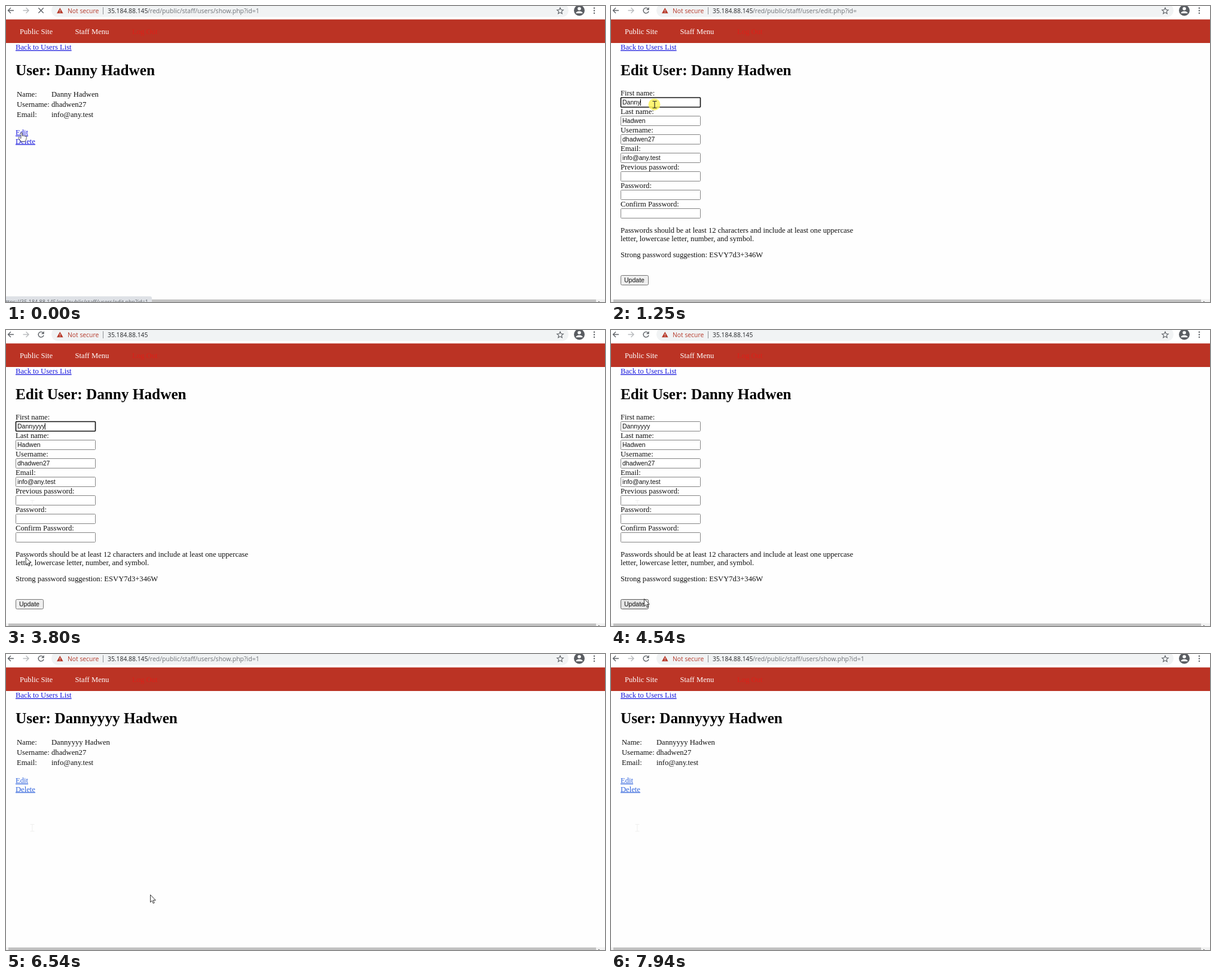
These frames come from a looping animation (1002x496 px, 8 s). An HTML page:

```html
<!DOCTYPE html>
<html lang="en">
<head>
<meta charset="utf-8">
<title>Edit user</title>
<style>
html, body { margin: 0; width: 100%; height: 100%; overflow: hidden; background: #fefefe; }
svg { display: block; width: 1002px; height: 496px; }
text { white-space: pre; }
.page { font: 12.63px "Liberation Serif", "Times New Roman", serif; fill: #111; }
.h1 { font-size: 25.27px; font-weight: bold; fill: #000; }
.link { fill: #1a1add; text-decoration: underline; }
.fresh .act { fill: #2f62dc; }
.ctl { font: 10.53px "Liberation Sans", Arial, sans-serif; fill: #111; }
.ui { font: 10.35px "Open Sans", "Noto Sans", sans-serif; }
.status { font-size: 9px; fill: #5f6368; }
.box { fill: #fff; stroke: #858585; }
.icon { fill: none; stroke: #5f6368; stroke-width: 1.4; }
</style>
</head>
<body>
<svg id="stage" viewBox="0 0 1002 496" xmlns="http://www.w3.org/2000/svg">
  <rect width="1002" height="496" fill="#fefefe"/>

  <g id="toolbar">
    <rect width="1002" height="23" fill="#fff"/>
    <rect x="76" y="-4" width="865" height="22.5" rx="11.2" fill="#f1f3f4"/>
    <path class="icon" d="M13 7.5H3.5M8 3 3.5 7.5 8 12"/>
    <path class="icon" style="stroke:#b9bbbe" d="M28.500 7.500H38M33.500 3 38 7.500 33.500 12"/>
    <path id="stop" class="icon" d="M54.300 3.300 62.700 11.700M62.700 3.300 54.300 11.700"/>
    <g id="reload">
      <path class="icon" d="M62 4.600A4.500 4.500 0 1 0 63 8.800"/>
      <path fill="#5f6368" d="M63.700 2V6.800H58.900Z"/>
    </g>
    <path fill="#b83a2a" d="M90.300 3 95.600 12.300H85Z"/>
    <path stroke="#f1f3f4" d="M90.300 6.300V9.200M90.300 10.100V11.200"/>
    <text class="ui" x="103" y="12" fill="#b53a2b">Not secure</text>
    <path stroke="#8d9094" d="M162.500 2V14"/>
    <text class="ui" x="170" y="12" fill="#26282b">35.184.88.145</text>
    <text class="ui" id="path" x="237" y="12" fill="#6d7176" style="font-size:10.5px"></text>
    <path class="icon" style="stroke-width:1.100" d="M927 2.800 928.500 6.300 932.300 6.600 929.400 9.100 930.300 12.800 927 10.800 923.700 12.800 924.600 9.100 921.700 6.600 925.500 6.300Z"/>
    <circle cx="959" cy="7.500" r="9" fill="#5a5d62"/>
    <circle cx="959" cy="4.500" r="2.800" fill="#fff"/>
    <path fill="#fff" d="M953.300 12.200C953.300 7.500 964.700 7.500 964.700 12.200Z"/>
    <g fill="#5f6368">
      <circle cx="984" cy="3.500" r="1.200"/><circle cx="984" cy="7.700" r="1.200"/><circle cx="984" cy="11.900" r="1.200"/>
    </g>
  </g>

  <g class="page">
    <rect y="22.500" width="1002" height="39.500" fill="#bb3324"/>
    <text x="23" y="47" fill="#fff">Public Site</text>
    <text x="115.500" y="47" fill="#fff">Staff Menu</text>
    <text x="211" y="47" fill="#dc2019">Log Out</text>
    <text class="link" x="16" y="73">Back to Users List</text>
    <text class="h1" id="title" x="16" y="116"></text>
    <g id="show"></g>
    <g id="edit"></g>
  </g>

  <path id="ghost" fill="none" stroke="#efefee" d="M40.500 285.500H47.500M44 285.500V297M40.500 297H47.500"/>

  <rect y="491.500" width="1002" height="5" fill="#f1f1f1"/>
  <rect id="thumb" x="4" y="491.800" width="983" height="5"/>
  <path fill="#505050" d="M991 494.500 993.500 496H991Z"/>
  <g id="bubble">
    <path id="bubbleBox" fill="#dee1e6"/>
    <text class="ui status" id="status" y="498.500"></text>
  </g>

  <circle id="halo" r="10" fill="#fbf25c" opacity=".85"/>
  <g id="cursor">
    <path id="hand" fill="#fff" stroke="#333" stroke-width=".8" d="M-2 -6V3L-4.500 1C-6 0-7 1.500-6 2.500L-2 8H5C7 5 7.500 2 7 -.500 6.500 -1.500 5 -1.500 5 -.500 4.500 -2 3 -2 2.700 -1 2 -2.200 .5 -2 .3 -1V-6C.3 -7.500-2 -7.500-2 -6Z"/>
    <path id="beam" fill="none" stroke="#222" stroke-width="1.100" d="M-3.500 -5.500H-1L0 -5 1 -5.500H3.500M0 -5V5.500M-3.500 6H-1L0 5.500 1 6H3.500"/>
    <path id="arrow" fill="#fff" stroke="#222" stroke-width=".9" d="M.5 .5V13L3.300 10.300 5.200 14.800 7.200 14 5.300 9.600H9.300Z"/>
  </g>
</svg>
<script>
const LOOP = 8000;
const FIRST = "Danny", LAST = "Hadwen", LOGIN = "dhadwen27", MAIL = "info@any.test";
const HOST = "35.184.88.145", DIR = "/red/public/staff/users/";
const $ = id => document.getElementById(id);

function add(parent, tag, attrs, label) {
  const el = document.createElementNS("http://www.w3.org/2000/svg", tag);
  for (const key in attrs) el.setAttribute(key, attrs[key]);
  if (label) el.textContent = label;
  return parent.appendChild(el);
}
const text = (parent, x, y, label, cls = "") => add(parent, "text", { x, y, class: cls }, label);
const show = (id, on) => $(id).setAttribute("visibility", on ? "visible" : "hidden");
const within = (t, a, b) => t >= a && t < b;
function set(el, attrs) {
  for (const key in attrs) el.setAttribute(key, attrs[key]);
}

// user details page
const details = $("show");
["Name:", "Username:", "Email:"].forEach((s, i) => text(details, 18, 152 + 17 * i, s));
const fullName = text(details, 76, 152, " ");
text(details, 76, 169, LOGIN);
text(details, 76, 186, MAIL);
text(details, 16, 216, "Edit", "link act");
text(details, 16, 230.5, "Delete", "link act");

// edit form
const form = $("edit");
const fields = [["First name:", FIRST], ["Last name:", LAST], ["Username:", LOGIN], ["Email:", MAIL],
  ["Previous password:"], ["Password:"], ["Confirm Password:"]].map(([label, value], i) => {
  const y = 31 * i;
  text(form, 16, 150 + y, label);
  const box = add(form, "rect", { class: "box", x: 16.5, y: 153.5 + y, width: 133, height: 16, rx: 1 });
  return { box, value: text(form, 19, 165 + y, value || "", "ctl") };
});
text(form, 16, 380, "Passwords should be at least 12 characters and include at least one uppercase");
text(form, 16, 394, "letter, lowercase letter, number, and symbol.");
text(form, 16, 421, "Strong password suggestion: ESVY7d3+346W");
const button = add(form, "rect", { x: 16.5, y: 451.5, width: 46, height: 16, rx: 2 });
text(form, 22, 463, "Update", "ctl");
const caret = add(form, "rect", { y: 156, width: 1, height: 11, fill: "#111" });

// pointer moves: start, end, steps, control point, end point
const START = [27, 219];
const MOVES = [
  [460, 1050, 9, [65, 235], [73, 165]],
  [3340, 3530, 3, [44, 230], [44, 362]],
  [3730, 4140, 6, [2, 420], [55, 450]],
  [5950, 6010, 2, [140, 412], [215, 404]],
  [6140, 6210, 2, [230, 403], [241, 403]],
  [6680, 7150, 7, [420, 340], [561, 471]],
  [7480, 7800, 6, [568, 485], [575, 500]]
];
function pointer(t) {
  let from = START;
  for (const [a, b, n, mid, to] of MOVES) {
    if (t < a) break;
    const p = Math.min(1, (Math.floor((t - a) / (b - a) * (n - 1)) + 1) / n), q = 1 - p;
    from = [0, 1].map(i => q * q * from[i] + 2 * p * q * mid[i] + p * p * to[i]);
    if (p < 1) break;
  }
  return from;
}

function address(t) {
  if (t < 130) return DIR + "show.php?id=1";
  if (t < 1250) return DIR + "edit.php?id=1";
  if (t < 1320) return DIR + "edit.php?id=";
  return t < 5950 ? "" : DIR + "show.php?id=1";
}

function drawBubble(t) {
  const waiting = t > 5000;
  const right = waiting ? 327 : 244;
  const fade = waiting ? (t < 5950 ? 0 : t < 6410 ? 1 : t < 6540 ? 0.5 : 0)
                       : (t < 460 ? 1 : t < 534 ? 0.5 : 0);
  $("bubble").setAttribute("opacity", fade);
  $("bubbleBox").setAttribute("d", `M0 486.5H${right - 3}Q${right} 486.500 ${right} 489.500V496H0Z`);
  $("status").textContent = waiting ? `Waiting for ${HOST}...` : `https://${HOST}${DIR}edit.php?id=1`;
  set($("status"), { x: waiting ? -6 : 238, "text-anchor": waiting ? "start" : "end" });
}

function draw(t) {
  const editing = within(t, 130, 6140), saved = t >= 6140;
  const extra = [2340, 2600, 2790].filter(k => t >= k).length;
  const first = FIRST + "y".repeat(extra);
  const name = `${first} ${LAST}`;
  const focus = within(t, 1250, 4280);

  $("title").textContent = editing ? `Edit User: ${FIRST} ${LAST}` : `User: ${name}`;
  $("path").textContent = address(t);
  const loading = t < 130 || within(t, 5480, 6140);
  show("stop", loading);
  show("reload", !loading);

  show("show", !editing);
  details.setAttribute("class", saved ? "fresh" : "");
  fullName.textContent = name;

  form.setAttribute("display", editing ? "inline" : "none");
  fields[0].value.textContent = first;
  fields[0].box.setAttribute("style", focus ? "stroke:#101010;stroke-width:1.6" : "");
  const caretOn = within(t, 1250, 1810) || within(t, 2340, 3340) || within(t, 3730, 4280);
  set(caret, { x: 49 + 5.27 * extra, opacity: caretOn ? 1 : 0 });
  const hover = within(t, 4140, 5480), press = within(t, 5070, 5210);
  set(button, { fill: press ? "#f5f5f5" : hover ? "#e5e5e5" : "#efefef", stroke: hover ? "#5c5c5c" : "#767676" });

  const [x, y] = pointer(t);
  $("cursor").setAttribute("transform", `translate(${x.toFixed(1)} ${y.toFixed(1)})`);
  show("hand", t < 130);
  show("beam", within(t, 130, 3730));
  show("arrow", within(t, 3730, 7940));
  show("halo", within(t, 1250, 1540) || within(t, 4280, 4540));
  set($("halo"), { cx: x - 0.5, cy: y });
  show("ghost", t >= 3530);
  $("thumb").setAttribute("fill", y > 488 && t < 7940 ? "#a8a8a8" : "#c1c1c1");
  drawBubble(t);
}

const began = performance.now();
function tick() {
  draw((performance.now() - began) % LOOP);
  requestAnimationFrame(tick);
}
tick();
</script>
</body>
</html>
```
